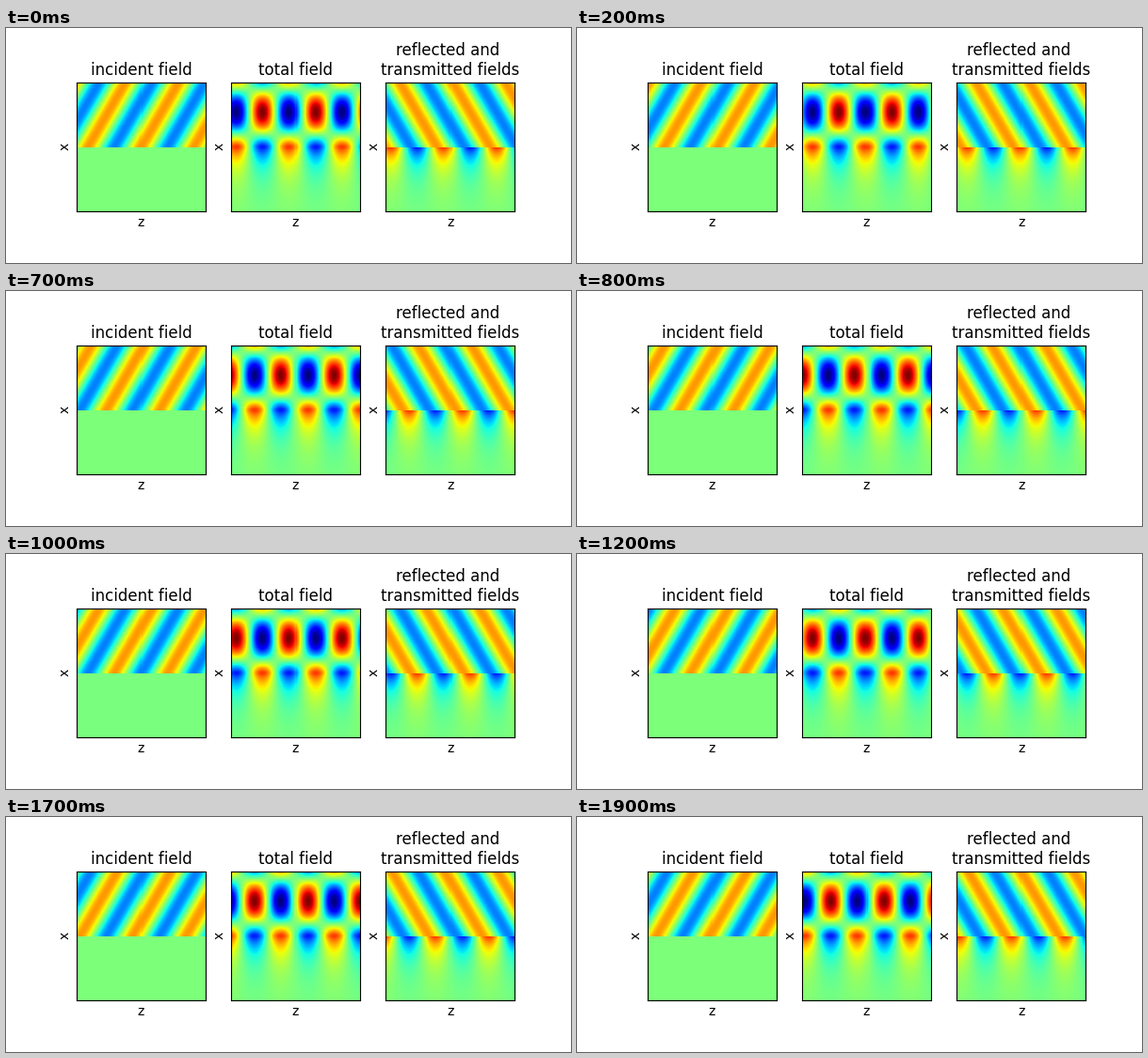
A matplotlib script that plays this animation: 600 px wide and 250 px high, repeating every 2000 ms.

```python
import numpy as np
import matplotlib.pyplot as plt
from matplotlib.animation import FuncAnimation

FRAMES = 20
SIZE = 136                        # samples per panel side

# Lengths are in panel widths, with the origin at the panel centre.
KZ = 2 * np.pi * 136.8 / 56       # along the interface
KX = KZ / np.tan(np.radians(60))  # across it
DECAY = 136.8 / 18.5              # evanescent decay below the interface
SHIFT = np.radians(88)            # phase shift on reflection

plt.rcParams["font.family"] = "DejaVu Sans"

pos = (np.arange(SIZE) + 0.5) / SIZE - 0.5
z, x = np.meshgrid(pos, pos)
above = x > 0

incoming = np.where(above, np.exp(1j * (KZ * z - KX * x)), 0)
reflected = np.exp(1j * (KZ * z + KX * x + SHIFT))
transmitted = ((1 + np.exp(1j * SHIFT)) * np.exp(1j * KZ * z)
               * np.exp(DECAY * np.minimum(x, 0)))
outgoing = np.where(above, reflected, transmitted)
panels = [
    ("incident field", incoming),
    ("total field", incoming + outgoing),
    ("reflected and \ntransmitted fields", outgoing),
]

fig, axes = plt.subplots(1, 3, figsize=(6, 2.5), dpi=100)
images = []
for ax, (title, field) in zip(axes, panels):
    images.append(ax.imshow(field.real, cmap="jet", vmin=-2, vmax=2,
                            origin="lower", interpolation="nearest"))
    ax.set_title(title, fontsize=12)
    ax.set_xlabel("z", fontsize=10)
    ax.set_ylabel("x", fontsize=10)
    ax.set_xticks([])
    ax.set_yticks([])


def update(frame):
    turn = np.exp(-2j * np.pi * frame / FRAMES)
    for image, (_, field) in zip(images, panels):
        image.set_data((field * turn).real)
    return images


anim = FuncAnimation(fig, update, frames=FRAMES, interval=100, repeat=True)
plt.show()
```
